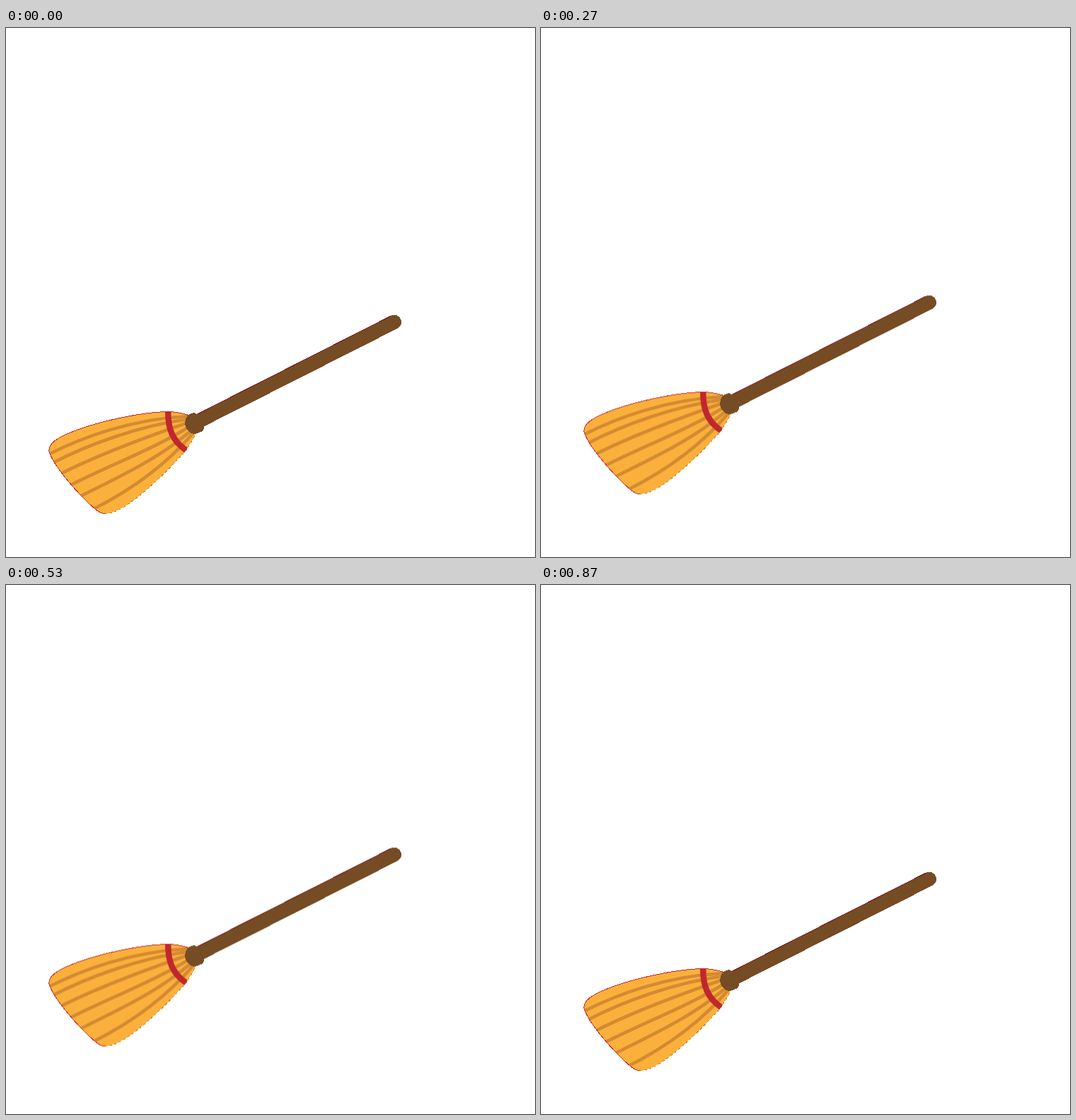
These frames come from a looping animation (748x748 px, 910 ms). An HTML page:

```html
<!DOCTYPE html>
<html lang="en">
<head>
<meta charset="utf-8">
<title>Floating broom</title>
<style>
  html, body { margin: 0; width: 100%; height: 100%; overflow: hidden; background: #fff; }
  svg { display: block; width: 100vw; height: 100vh; }
  path { fill: none; }
  .crisp { shape-rendering: crispEdges; }
  .stripes { stroke: #d38a32; stroke-width: 4.6; }
  .band { stroke: #c1272d; stroke-width: 8.4; }
  .fringe { stroke: #c1272d; stroke-width: 1; }
  .wood { stroke: #754c24; stroke-width: 20.4; stroke-linecap: round; }
</style>
</head>
<body>
<svg viewBox="0 0 748 748">
  <defs>
    <path id="head" d="M262 549C255 546 245 543 230 542.5C190 543 120 558 82 576C66 584 60 590 61 599C66 617 100 658 127 681C135 687 139 687.5 147 686C176 679 222 633 254 598C259 590 265 582 269 571Z"/>
    <clipPath id="clip"><use href="#head"/></clipPath>
  </defs>
  <g id="broom">
    <path class="crisp" style="fill:#fbb03b" d="M262 549C255 546 245 543 230 542.5C190 543 120 558 82 576C66 584 60 590 61 599C66 617 100 658 127 681C135 687 139 687.5 147 686C176 679 222 633 254 598C259 590 265 582 269 571Z"/>
    <g class="stripes" clip-path="url(#clip)">
      <path d="M60 603C105 580 175 553 258 549"/>
      <path d="M64 616C115 589 190 562 258 553"/>
      <path d="M74 632C130 603 205 576 260 557"/>
      <path d="M88 648C140 621 212 594 262 562"/>
      <path d="M103 663C158 636 222 606 265 566"/>
      <path d="M122 681C180 652 230 614 267 570"/>
    </g>
    <path class="fringe crisp" d="M262 549C255 546 245 543 230 542.5C190 543 120 558 82 576C66 584 60 590 61 599C66 617 100 658 127 681C132 685 136 687 141 687"/>
    <path class="crisp" stroke="#b9792c" stroke-dasharray="3 4" d="M147 686C176 679 222 633 254 598C259 590 265 582 269 571"/>
    <path class="band" d="M229.2 542.5C229 567 235.5 584 254.5 597"/>
    <path class="wood crisp" d="M270 557L548.8 415.8"/>
    <path class="crisp" stroke="#7d1c22" d="M272 545.3L544 407.2"/>
    <path class="crisp" style="fill:#754c24" d="M272 547L266 544Q257 545 254 553Q251 563 258 570Q263 575 269 573.5L278 570Q281 566 280 561Z"/>
  </g>
</svg>
<script>
  const LOOP = 910, HALF = 13, RISE = 45;

  // Rise and fall in equal steps, thirty per second on a 10 ms clock.
  const steps = Array.from({ length: 2 * HALF + 1 }, (_, k) => ({
    offset: Math.round(k * 10 / 3) * 10 / LOOP,
    transform: `translateY(${-RISE * (1 - Math.abs(k - HALF) / HALF)}px)`,
    easing: 'steps(1, end)'
  }));
  steps.push({ offset: 1, transform: 'translateY(0px)' });

  document.getElementById('broom').animate(steps, { duration: LOOP, iterations: Infinity });
</script>
</body>
</html>
```
